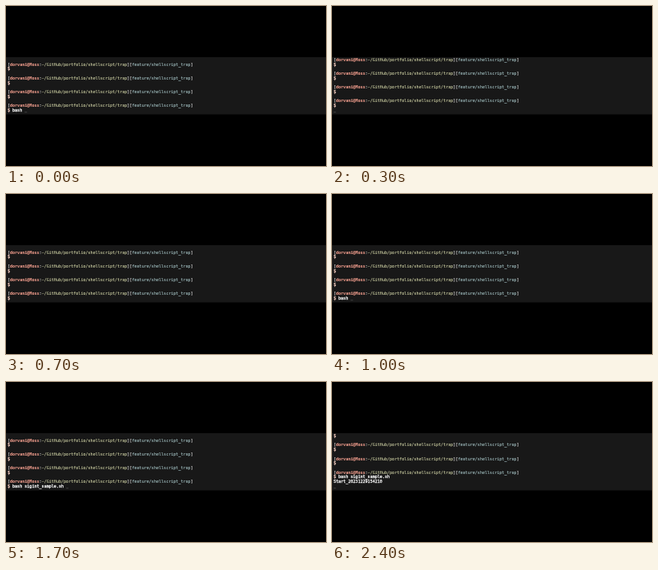
An HTML page with a canvas for the animation above (2500 ms loop, 400 by 200 pixels).

```html
<!DOCTYPE html>
<html lang="en">
<head>
<meta charset="utf-8">
<title>Terminal session</title>
<style>
  html, body { margin: 0; width: 100%; height: 100%; overflow: hidden; background: #000; }
  canvas { display: block; width: 400px; height: 200px; }
</style>
</head>
<body>
<canvas id="stage" width="400" height="200"></canvas>
<script>
const ctx = document.getElementById('stage').getContext('2d');
const LOOP = 2500;
const LEFT = 1.9, CELL = 3.05, BASE = 68.9, LINE = 5.73;
const LAST_ROW = 11;
const SCALE = CELL / 12.04; // 20px type has a 12.04px advance
const FAMILY = '"DejaVu Sans Mono", monospace';
const COLORS = {
  screen: '#181818', plain: '#f4f4f4', mark: '#efc9bc',
  user: '#ee9c8c', path: '#d0d3a6', branch: '#a6c4c6', cursor: '#555'
};
// Outline widths, in 20px type
const THIN = 0.3, HEAVY = 1.1;

const PROMPT = [
  ['[', COLORS.plain],
  ['dorvani@Moss', COLORS.user, true],
  [':', COLORS.plain],
  ['~/GitHub/portfolio/shellscript/trap', COLORS.path],
  ['][', COLORS.plain],
  ['feature/shellscript_trap', COLORS.branch],
  [']', COLORS.plain]
];
const COMMAND = 'bash sigint_sample.sh ';

// [start ms, rows scrolled, typed characters, cursor shown]
const STEPS = [
  [0, 0, 5, true],
  [100, 1, 0, true],
  [200, 0, 0, true],
  [300, 1, 0, true],
  [400, 0, 0, true],
  [500, 1, 0, true],
  [600, 0, 0, true],
  [700, 0, 0, false],
  [800, 0, 1, true],
  [900, 0, 3, true],
  [1000, 0, 5, true],
  [1100, 0, 6, true],
  [1300, 0, 7, true],
  [1400, 0, 8, true],
  [1600, 0, 9, true],
  [1700, 0, COMMAND.length, true],
  [2100, 0, COMMAND.length, false],
  [2300, 1, COMMAND.length, true],
  [2400, 2, COMMAND.length, true]
];

const baseline = row => BASE + row * LINE;

function write(row, col, text, color, { bold = false, weight = THIN } = {}) {
  ctx.save();
  ctx.translate(LEFT + col * CELL, baseline(row));
  ctx.scale(SCALE, SCALE);
  ctx.font = `${bold ? 'bold ' : ''}20px ${FAMILY}`;
  ctx.fillStyle = ctx.strokeStyle = color;
  ctx.lineWidth = weight;
  ctx.fillText(text, 0, 0);
  ctx.strokeText(text, 0, 0);
  ctx.restore();
}

function writePrompt(row) {
  let col = 0;
  for (const [text, color, bold] of PROMPT) {
    write(row, col, text, color, { bold });
    col += text.length;
  }
}

function draw(time) {
  const [, scroll, typed, cursor] = STEPS.findLast(step => step[0] <= time);
  const heavy = { weight: HEAVY };
  ctx.fillStyle = '#000';
  ctx.fillRect(0, 0, 400, 200);
  ctx.fillStyle = COLORS.screen;
  ctx.fillRect(0, 64, 400, 71.5);

  for (let i = 1; i < LAST_ROW; i += 3) {
    const row = i - scroll;
    if (row >= 0) writePrompt(row);
    write(row + 1, 0, '$', COLORS.mark, heavy);
  }
  write(LAST_ROW - scroll, 2, COMMAND.slice(0, typed), COLORS.plain, heavy);
  if (scroll === 2) write(LAST_ROW - 1, 0, 'Start_20231229154210', COLORS.plain, heavy);

  if (cursor) {
    const col = scroll ? 0 : 2 + typed;
    ctx.fillStyle = COLORS.cursor;
    ctx.fillRect(LEFT + col * CELL, baseline(LAST_ROW) + 0.6, CELL, 0.6);
  }
}

function tick() {
  draw(performance.now() % LOOP);
  requestAnimationFrame(tick);
}
tick();
</script>
</body>
</html>
```
